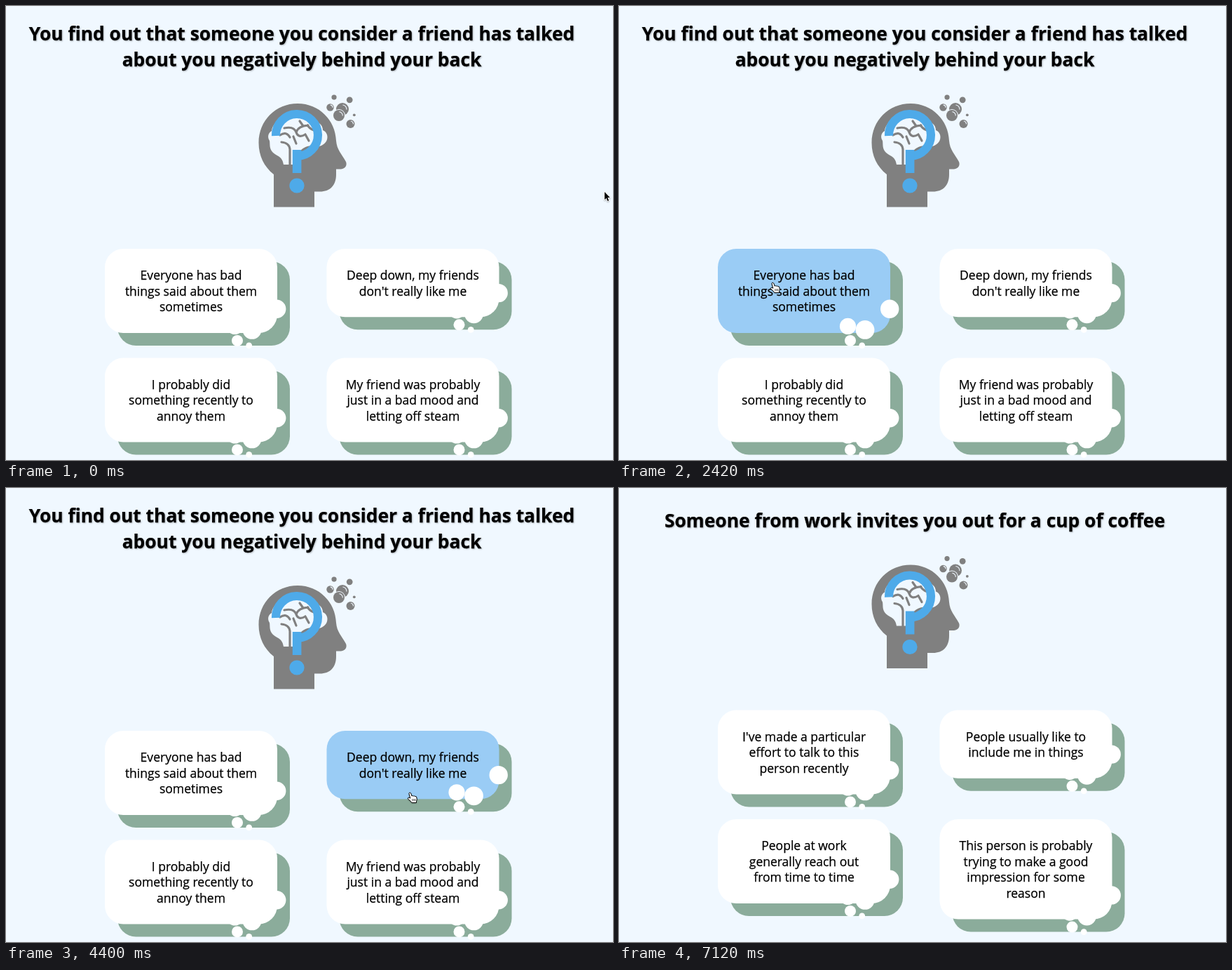
Write an HTML page with a canvas that moves like this. It is 866 px wide and 647 px high and loops after 8 s.

```html
<!DOCTYPE html>
<html lang="en">
<head>
<meta charset="utf-8">
<title>Thought cards</title>
<style>
html, body { margin: 0; width: 100%; height: 100%; overflow: hidden; background: #f0f8ff; }
canvas { display: block; width: 100vw; height: 100vh; }
</style>
</head>
<body>
<canvas id="stage" width="866" height="647"></canvas>
<script>
const ctx = document.getElementById('stage').getContext('2d');
const LOOP = 8000, HOVER_FADE = 150, HOVER_SAMPLES = 10;
const SUBMIT = 5500, CLEAR = 6190, NEXT = 6960, READY = 7120;
const BG = '#f0f8ff', GREY = '#808080', BLUE = '#4eaae9', GREEN = '#8bac9b';
const CARD = { x: 141, w: 246, radius: 26.3, pad: 26, line: 22.65, shadow: 18, dx: 316.5, dy: 155.5 };

const scenes = [
  {
    title: ['You find out that someone you consider a friend has talked',
            'about you negatively behind your back'],
    titleY: 48.8, top: 346,
    cards: [
      ['Everyone has bad', 'things said about them', 'sometimes'],
      ['Deep down, my friends', "don't really like me"],
      ['I probably did', 'something recently to', 'annoy them'],
      ['My friend was probably', 'just in a bad mood and', 'letting off steam']
    ]
  },
  {
    title: ['Someone from work invites you out for a cup of coffee'],
    titleY: 56, top: 316.5,
    cards: [
      ["I've made a particular", 'effort to talk to this', 'person recently'],
      ['People usually like to', 'include me in things'],
      ['People at work', 'generally reach out', 'from time to time'],
      ['This person is probably', 'trying to make a good', 'impression for some', 'reason']
    ]
  }
];

const pointerStart = { x: 854, y: 265 };
const moves = [
  { from: 80, to: 480, x: 430, y: 380 },
  { from: 890, to: 900, x: 332, y: 406 },
  { from: 900, to: 1230, x: 217, y: 394 },
  { from: 2420, to: 2740, x: 488, y: 407 },
  { from: 3340, to: 3500, x: 310, y: 545 },
  { from: 3750, to: 3990, x: 552, y: 408 },
  { from: 4160, to: 4400, x: 576.5, y: 434 },
  { from: NEXT, to: READY, x: 835, y: 410 }
];

const clamp = v => Math.max(0, Math.min(1, v));
const easeOut = u => 1 - (1 - u) ** 3;
const lerp = (a, b, k) => a + (b - a) * k;

function pointerAt(t) {
  let { x, y } = pointerStart;
  for (const move of moves) {
    const k = easeOut(clamp((t - move.from) / (move.to - move.from)));
    x = lerp(x, move.x, k);
    y = lerp(y, move.y, k);
  }
  return { x, y };
}

function cardRect(scene, i) {
  return {
    x: CARD.x + (i % 2) * CARD.dx,
    y: scene.top + (i >> 1) * CARD.dy,
    w: CARD.w,
    h: 2 * CARD.pad + scene.cards[i].length * CARD.line
  };
}

const inside = (p, r) => p.x > r.x && p.x < r.x + r.w && p.y > r.y && p.y < r.y + r.h;

// share of the last moments the pointer spent on the card: a linear fade in and out
function hoverLevel(t, rect) {
  let hits = 0;
  for (let k = 1; k <= HOVER_SAMPLES; k++) {
    hits += inside(pointerAt(t - k * HOVER_FADE / HOVER_SAMPLES), rect);
  }
  return hits / HOVER_SAMPLES;
}

function circle(x, y, r, color) {
  ctx.fillStyle = color;
  ctx.beginPath();
  ctx.arc(x, y, r, 0, Math.PI * 2);
  ctx.fill();
}

function box({ x, y, w, h }, color) {
  ctx.fillStyle = color;
  ctx.beginPath();
  ctx.roundRect(x, y, w, h, CARD.radius);
  ctx.fill();
}

function fillPath(d, color) {
  ctx.fillStyle = color;
  ctx.fill(new Path2D(d));
}

function strokePath(d, color, width) {
  ctx.strokeStyle = color;
  ctx.lineWidth = width;
  ctx.stroke(new Path2D(d));
}

function text(lines, x, y, step, font) {
  ctx.font = font + ' "Open Sans", sans-serif';
  ctx.textAlign = 'center';
  ctx.fillStyle = ctx.strokeStyle = '#000';
  ctx.lineWidth = 0.25;
  lines.forEach((line, i) => {
    ctx.fillText(line, x, y + i * step);
    ctx.strokeText(line, x, y + i * step);
  });
}

function glossyBubble(x, y, r) {
  circle(x, y, r + 1, BG);
  circle(x, y, r, GREY);
  ctx.strokeStyle = BG;
  ctx.lineWidth = 1.1;
  ctx.beginPath();
  ctx.arc(x, y, r * 0.66, -1.5, 0.1);
  ctx.stroke();
}

function drawBubbles() {
  glossyBubble(480, 147, 9);
  glossyBubble(475, 156, 8);
  glossyBubble(491.5, 168, 6);
  glossyBubble(462.5, 144.5, 5.2);
  [3.6, 4.4, 1.9].forEach((r, i) => {
    const angle = 1.1 * i - 1.95;
    circle(476 + 21.5 * Math.cos(angle), 150 + 21.5 * Math.sin(angle), r, GREY);
  });
}

function drawIcon(dy) {
  ctx.save();
  ctx.translate(0, dy);
  ctx.lineCap = ctx.lineJoin = 'round';
  fillPath('M382 286.5V240C368 229 360.5 213 360.5 195C360.5 163 385 139 416 139' +
    'C447 139 470 163 471 192C472 205 479 211 485 222C487 227 484 232 478 232.5H471' +
    'V240C471 256 462 264.5 448 264.5H440V286.5Z', GREY);

  // brain
  fillPath('M396 226C394 214 388 215 381 209C375 203 377 197 376 192C372 186 375 180 379 178' +
    'C380 168 388 163 394 163C401 155 412 155 418 158C428 155 437 159 441 165' +
    'C449 166 452 172 452 177C460 180 461 192 453 197C446 203 437 198 430 200' +
    'C424 202 420 205 417 210L409 226Z', BG);
  strokePath('M405 226V204Q404 195 393 194M391 184Q400 178 405 187M397 174Q411 171 414 180' +
    'T427 183M414 180Q417 171 431 170M424 171L419 164M430 170Q436 178 444 178' +
    'M427 183L432 192M410 186L414 196', GREY, 3.2);

  // question mark
  ctx.lineCap = 'butt';
  strokePath('M385 185A30 30 0 1 1 415 214', BLUE, 12.2);
  ctx.fillStyle = BLUE;
  ctx.fillRect(408.8, 205, 12.6, 33);
  circle(415, 256, 10.6, BLUE);

  drawBubbles();
  ctx.restore();
}

function drawCard(lines, rect, hover) {
  const { x, y, w, h } = rect;
  const right = x + w, bottom = y + h;
  box({ x: x + CARD.shadow, y: y + CARD.shadow, w, h }, GREEN);
  box(rect, `rgb(${lerp(255, 154, hover)},${lerp(255, 204, hover)},${lerp(255, 245, hover)})`);
  const puff = (dx, dy, r) => circle(right - dx, bottom + dy, r, '#fff');
  puff(0.8, -34.2, 13.2);
  puff(60.5, -9.5, 11.6);
  puff(36, -4.5, 13.4);
  puff(57, 11, 8);
  puff(40.3, 18, 4.4);
  text(lines, x + w / 2, y + 44.1, CARD.line, '17.55px');
}

function drawTitle(scene) {
  ctx.save();
  ctx.shadowColor = 'rgba(0,0,0,.25)';
  ctx.shadowOffsetX = ctx.shadowOffsetY = 1;
  ctx.shadowBlur = 2;
  text(scene.title, 422, scene.titleY, 36.9, 'bold 26.4px');
  ctx.restore();
}

function drawScene(scene, t) {
  drawTitle(scene);
  drawIcon(scene.top - scenes[0].top);
  scene.cards.forEach((lines, i) => {
    const rect = cardRect(scene, i);
    drawCard(lines, rect, t < CLEAR ? hoverLevel(t, rect) : 0);
  });
}

function drawPointer({ x, y }, hand) {
  ctx.save();
  ctx.translate(x, y);
  ctx.lineJoin = 'round';
  ctx.shadowColor = 'rgba(0,0,0,.3)';
  ctx.shadowBlur = 2;
  ctx.shadowOffsetY = 1;
  if (hand) {
    const shape = 'M-1.6 1.5Q-1.4 -.3 .3 .2Q1.2 .6 1.5 2L2.5 5Q4 3.8 5 5.2Q6.4 4.2 7.2 5.6' +
      'Q9 5 9.4 7Q10.3 10.5 9 12.3V14.5H2.3Q1.5 12.4 -2.4 9.7Q-4 8 -2.5 7.2Q-1.4 6.8 .3 8.2Z';
    fillPath(shape, '#fff');
    ctx.shadowColor = 'transparent';
    strokePath(shape, '#000', 1);
    strokePath('M3.3 9V12M5.3 9V12M7.2 9V12', '#000', 0.7);
  } else {
    const shape = 'M0 0V11L2.5 8.7L4.3 13L6.1 12.2L4.3 8.1H7.7Z';
    strokePath(shape, '#fff', 1.8);
    ctx.shadowColor = 'transparent';
    fillPath(shape, '#000');
  }
  ctx.restore();
}

function opacityAt(t) {
  if (t < SUBMIT) return 1;
  if (t < CLEAR) return 0.5;
  return clamp((Math.floor((t - NEXT) / 80) + 1) / 3);
}

function render(t) {
  const scene = scenes[t < CLEAR ? 0 : 1];
  ctx.fillStyle = BG;
  ctx.fillRect(0, 0, 866, 647);
  drawScene(scene, t);
  ctx.globalAlpha = 1 - opacityAt(t);
  ctx.fillStyle = BG;
  ctx.fillRect(0, 0, 866, 647);
  ctx.globalAlpha = 1;
  if (t < READY) {
    const pointer = pointerAt(t);
    const onCard = scene.cards.some((_, i) => inside(pointer, cardRect(scene, i)));
    drawPointer(pointer, t < CLEAR && onCard);
  }
}

const start = performance.now();
function tick() {
  render((performance.now() - start) % LOOP);
  requestAnimationFrame(tick);
}
tick();
</script>
</body>
</html>
```
